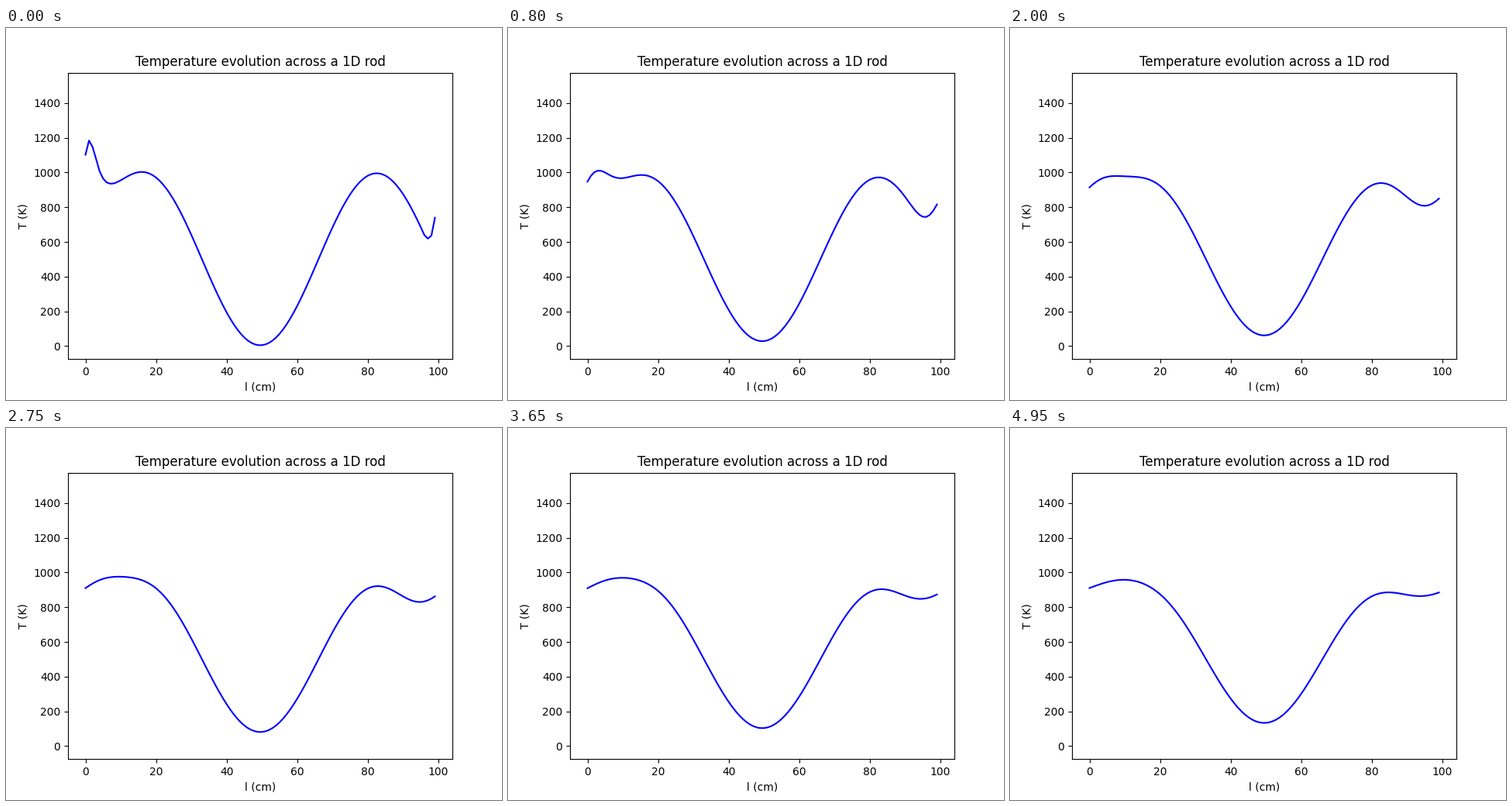
A matplotlib script that plays this animation: 640 px wide and 480 px high, repeating every 5 s.

```python
import matplotlib.pyplot as plt
import numpy as np
from matplotlib.animation import FuncAnimation

FRAMES = 100
WARMUP = 3        # steps taken before the first picture
R = 0.335         # diffusion number per step
CONTACT = 0.29    # weak thermal contact between the two rod ends
DECAY = 0.306     # fall-off of the hot left end, per cm

x = np.arange(100)


def initial():
    wave = 500 + 500 * np.sin(3 * np.pi * x / 99)
    return wave + 1000 * np.exp(-DECAY * x)


def step(T):
    flow = 2 * CONTACT * (T[0] - T[-1])
    padded = np.concatenate(([T[1] - flow], T, [T[-2] + flow]))
    return T + R * (padded[:-2] - 2 * T + padded[2:])


def simulate():
    T = initial()
    states = []
    for n in range(WARMUP + FRAMES):
        if n >= WARMUP:
            states.append(T)
        T = step(T)
    return states


states = simulate()

fig, ax = plt.subplots(figsize=(6.4, 4.8), dpi=100)
line, = ax.plot(x, states[0], color="blue", lw=1.5)
ax.set_xlim(-4.95, 103.95)
ax.set_ylim(-75, 1575)
ax.set_title("Temperature evolution across a 1D rod")
ax.set_xlabel("l (cm)")
ax.set_ylabel("T (K)")


def update(i):
    line.set_ydata(states[i])
    return line,


anim = FuncAnimation(fig, update, frames=FRAMES, interval=50,
                     repeat=True, repeat_delay=0)
plt.show()
```
